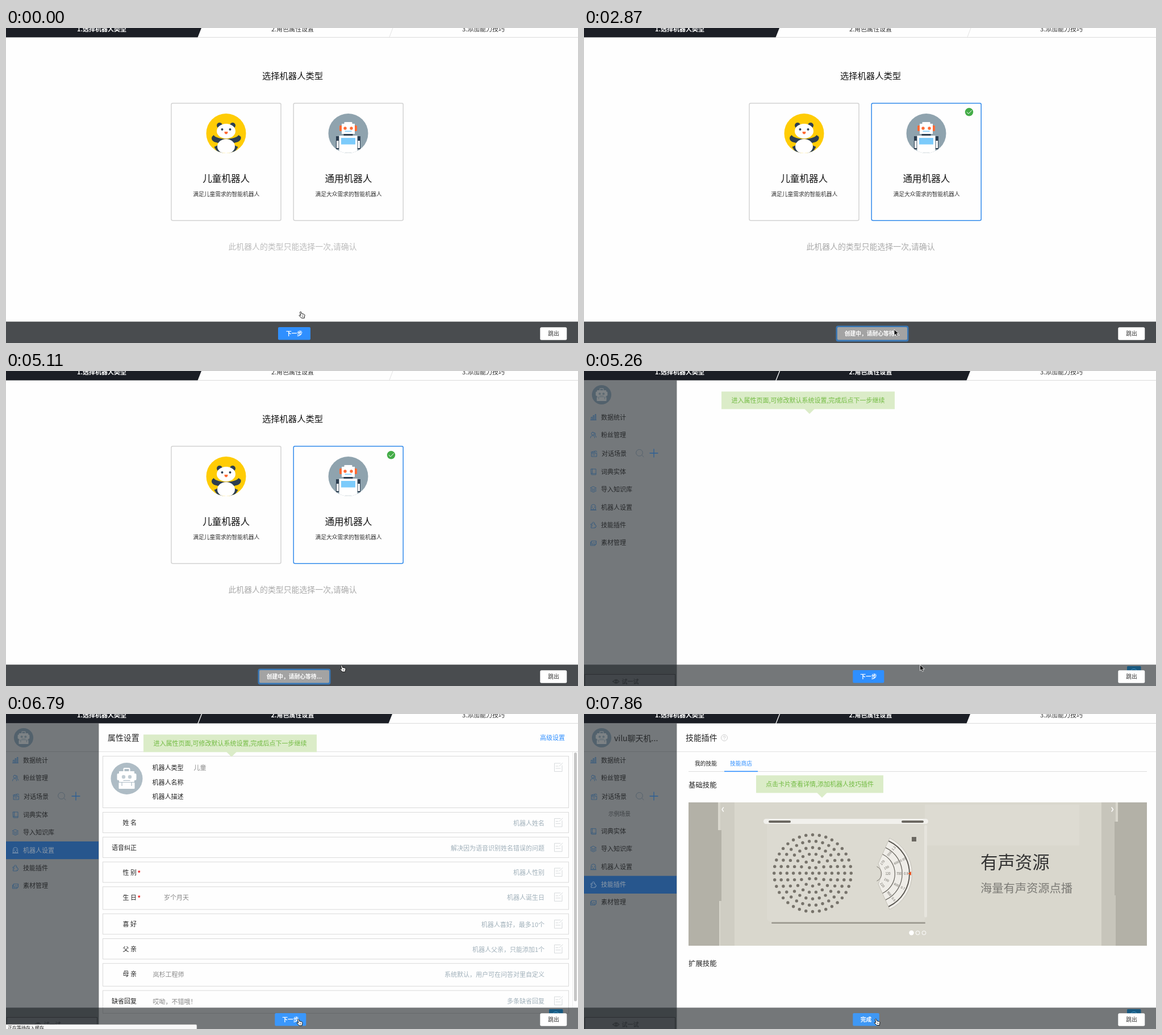
Recreate the animation shown at these times as an HTML page. Size 1007 by 556 pixels, loop 8 s.

```html
<!DOCTYPE html>
<html lang="zh-CN">
<head>
<meta charset="utf-8">
<title>机器人创建向导</title>
<style>
html, body { margin: 0; width: 100%; height: 100%; overflow: hidden; background: #fefefe; }
svg { display: block; width: 1007px; height: 556px; font-family: "Noto Sans CJK SC", "Noto Sans", sans-serif; }
</style>
</head>
<body>
<svg id="stage" viewBox="0 0 1007 556">
  <g id="scene"></g>
  <g id="cursor"></g>
</svg>
<script>
const LOOP = 8000;
const BLUE = '#2f8fff', INK = '#26282a', DARK = '#1b1e25', NAVY = '#2c3e50';

// Basic shapes
const rect = (x, y, w, h, fill, more = '') =>
  `<rect x="${x}" y="${y}" width="${w}" height="${h}" fill="${fill}" ${more}/>`;
const circle = (x, y, r, fill, more = '') =>
  `<circle cx="${x}" cy="${y}" r="${r}" fill="${fill}" ${more}/>`;
const path = (d, fill, more = '') => `<path d="${d}" fill="${fill}" ${more}/>`;
const line = (d, stroke, w = 1) =>
  path(d, 'none', `stroke="${stroke}" stroke-width="${w}" stroke-linecap="round" stroke-linejoin="round"`);
const frame = (x, y, w, h, stroke, sw = 1, r = 0) =>
  rect(x, y, w, h, '#fefefe', `stroke="${stroke}" stroke-width="${sw}" rx="${r}"`);
// Text placed by the vertical middle of its glyphs
const text = (x, mid, size, str, fill = '#222', anchor = 'start', weight = 400, more = '') =>
  `<text x="${x}" y="${(mid + size * 0.375).toFixed(2)}" font-size="${size}" fill="${fill}" text-anchor="${anchor}" font-weight="${weight}" ${more}>${str}</text>`;

function header(step) {
  const edge = step === 1 ? 344 : 680;
  const labels = [[168.5, '1.选择机器人类型'], [504.5, '2.角色属性设置'], [840.5, '3.添加能力技巧']];
  return rect(0, 0, 1007, 16.5, '#fefefe') + rect(edge - 6, 16, 1007 - edge + 6, 1, '#dcdcdc') +
    path(`M0 0H${edge}L${edge - 6.5} 16.500H0Z`, DARK) +
    (step === 1 ? line('M681 0L675 16', '#e4e4e4') : line('M344.500 0L338 16.500', '#fff', 1.3)) +
    labels.map(([x, s], i) => text(x, 2, 11, s, i < step ? '#fff' : '#333', 'middle', i < step ? 700 : 500)).join('');
}

function panda() {
  return `<g transform="translate(387.5 186)">` + circle(0, 0, 35, '#ffcc05') +
    `<g clip-path="url(#disc)">` +
    path('M-22 3C-16 12 16 12 22 3L26 6Q27 12 21 15L10 18H-10L-21 15Q-27 12-25 6Z', NAVY) +
    path('M-21 24L-13 20 -6 35H-14ZM21 24L13 20 6 35H14Z', NAVY) +
    `<ellipse cx="0" cy="23" rx="15.500" ry="13" fill="#fff"/>` +
    circle(-11.5, -14, 5, NAVY) + circle(11.5, -14, 5, NAVY) +
    `<ellipse cx="0" cy="-4" rx="16.500" ry="13" fill="#fff"/>` +
    circle(-7, -7, 2, NAVY) + circle(7, -7, 2, NAVY) +
    path('M-3-3H3Q3 1 0 1.500Q-3 1-3-3Z', '#ff6b35') + `</g></g>`;
}

function robot() {
  const arm = x => rect(x, 5, 5.5, 23, NAVY) + rect(x + 1, 13, 3.5, 13, '#fff');
  return `<g transform="translate(602.5 186)">` + circle(0, 0, 35, '#8fa3ae') +
    `<g clip-path="url(#disc)">` + arm(-21.5) + arm(16) +
    rect(-8, 0, 16, 5, NAVY) + rect(-16, 4, 32, 32, '#fff') + rect(-12.5, 8, 25, 11.5, '#7ccbfb') +
    line('M-5 34H5', '#d7dde0') +
    rect(-15.500, -14, 31, 10, '#ff6b35', 'rx="1.5"') + rect(-7, -20, 14, 6, '#fff', 'rx="1"') +
    rect(-11.5, -17, 23, 18, '#fff') +
    circle(-5.5, -9, 2.7, '#ff6b35') + circle(5.5, -9, 2.7, '#ff6b35') +
    rect(-6, -4.500, 12, 1.5, '#7ccbfb') + `</g></g>`;
}

function choosePage(s) {
  const card = (x, title, note, stroke) => frame(x, 132.7, 193, 207, stroke, 1.5, 2.5) +
    text(x + 96.7, 266, 16.6, title, '#111', 'middle') + text(x + 96.7, 293.500, 9.75, note, '#333', 'middle');
  return text(504.500, 84.500, 15.3, '选择机器人类型', '#111', 'middle') +
    card(291, '儿童机器人', '满足儿童需求的智能机器人', '#d3d3d3') +
    card(506.2, '通用机器人', '满足大众需求的智能机器人', s.picked ? '#338bec' : '#d3d3d3') +
    panda() + robot() +
    (s.checked ? circle(678, 148.300, 7.2, '#43ac47') + line('M674 148.500L677 151.300 682.300 145.700', '#fff') : '') +
    text(504.500, 386, 13.9, '此机器人的类型只能选择一次,请确认', s.settled ? '#a9a9a9' : '#bcbcbc', 'middle');
}

function avatar(x, y, k, back, front) {
  const eye = ex => circle(ex, -3, 3.200, back, 'opacity=".75"');
  return `<g transform="translate(${x} ${y}) scale(${k})">` + circle(0, 0, 28, back) +
    rect(-5, -18, 10, 6, 'none', `stroke="${front}" stroke-width="2" rx="1"`) +
    rect(-13.5, -13, 27, 19, front, 'rx="1"') + rect(-17, -9, 34, 12, front, 'rx="2"') +
    eye(-5.5) + eye(5.5) + rect(-6, 2.800, 12, 1.2, back) +
    rect(-14, 7, 28, 11, front, 'rx="1"') + rect(-9, 7, 1.2, 6, back) + rect(8, 7, 1.2, 6, back) + `</g>`;
}

// Menu entries: label, middle, icon path in a 10 px box
const MENU = [
  ['数据统计', 81.5, 'M0 10H10M1 9V5H3V9M4.500 9V2H6V9M8 9V0H9.500V9'],
  ['粉丝管理', 113, 'M4 0A2.300 2.300 0 1 0 4 5A2.300 2.300 0 1 0 4 0M0 10Q0 6 4 6T7 10M6.500 1A2 2 0 1 1 7 5Q10 6 10 9'],
  ['对话场景', 146, 'M1 4H10V10H1ZM1 4L0 2 9 0 10 2M3 1.500L4 4M6 1L7 4M3 7H7'],
  ['词典实体', 178, 'M1 0H9.500V10H2Q1 10 1 8.500ZM1 8H9.500M3 0V8'],
  ['导入知识库', 209, 'M5 0L10 2.500 5 5 0 2.500ZM0 5L5 7.500 10 5M0 7.500L5 10 10 7.500'],
  ['机器人设置', 240.500, 'M1 9V4Q1 0 5 0T9 4V9ZM0 10H10M3 4V5.500M7 4V5.500M4 7.500H6'],
  ['技能插件', 272, 'M1 3H3.500Q2 0 5 0T6 3H8V5Q10.500 5 10 7.500T8 8V10H1V7Q3.500 7 3 5.500T1 5Z'],
  ['素材管理', 303, 'M2 2H10V8H2ZM2 4H0V10H8V8M3.500 6.500L5.500 4.500 7 6 9 4']
];

function sidebar(s) {
  const active = s.page === 2 ? 5 : s.page === 3 ? 6 : -1;
  const items = MENU.map(([label, mid, icon], i) => {
    const y = mid + (s.named && i > 2 ? 29.3 : 0), on = i === active, dx = i === 2 ? 1 : 0;
    return (on ? rect(0, y - 15.6, 163, 31.300, '#27568d') : '') +
      `<g transform="translate(${11.500 + dx} ${y - 5})">` + line(icon, on ? '#7f98b3' : '#345a7e', 0.9) + `</g>` +
      text(30 + dx, y, 11, label, on ? '#8f9ba8' : INK, 'start', on ? 500 : 400);
  }).join('');
  return rect(0, 16, 163.4, 540, '#74787b') + avatar(31, 42, 0.61, '#52616c', '#7d8285') +
    (s.page > 1 ? rect(0, 66, 163, 1, '#676b6e') : '') +
    (s.named ? text(53, 43, 14, 'vilu聊天机...', INK) + text(43, 176.500, 9.75, '示例场景', '#3d4144') : '') +
    items + circle(97.500, 144.300, 5.800, 'none', 'stroke="#55626e"') + line('M101.800 148.500L105 151.500', '#55626e') +
    line('M116 145H130M123 138V152', '#2d5f95', 1.3);
}

function editIcon(y) {
  return line(`M976 ${y - 7}H965.500V${y + 7.500}H979V${y - 3}M968 ${y - 2}H972M968 ${y + 2}H976M974 ${y - 2}L980 ${y - 7.500}`, '#d3d6d9', 0.9);
}

function propsPage(s) {
  const on = s.loaded, grey = '#868686';
  const birth = on
    ? text(258, 0, 10.5, '11/10/2016', grey, 'start', 400, 'font-family="Liberation Sans, sans-serif" letter-spacing="-.6"') +
      text(323, 0, 11, '0岁0个月0天', grey) + text(402, 0, 11, '猴', grey) + text(432.500, 0, 11, '天蝎座', grey)
    : text(278, 0, 11, '岁个月天', grey);
  const val = v => text(258.500, 0.5, 11, v, grey);
  const rows = [
    ['姓 名', '机器人姓名'],
    ['语音纠正', '解决因为语音识别姓名错误的问题'],
    ['性 别', '机器人性别', on ? val('女') : '', 1],
    ['生 日', '机器人诞生日', birth, 1],
    ['喜 好', '机器人喜好，最多10个'],
    ['父 亲', '机器人父亲，只能添加1个'],
    ['母 亲', '系统默认，用户可在问答对里自定义', val('岚杉工程师')],
    ['缺省回复', '多条缺省回复', val('哎呦，不错哦！')]
  ];
  let y = 173, out = '';
  rows.forEach(([label, hint, value = '', must], i) => {
    const h = value ? 40.6 : 36.6;
    out += frame(170.500, y + 0.5, 820, h - 0.5, '#dadada') + text(230, y + 19, 11, label, '#222', 'end') +
      (must ? text(231.500, y + 20, 11, '*', '#e11', 'start', 700) : '') +
      `<g transform="translate(0 ${y + 19.3})">${value}</g>` +
      text(948, y + 19.700, 11, hint, '#a0b0ba', 'end') + (i === 6 ? '' : editIcon(y + 18.5));
    y += h + 7.2;
  });
  const field = (mid, label, value) => text(257.500, mid, 11, label, '#222') + value;
  return text(179, 42, 13.9, '属性设置', '#222') + text(984, 42, 11, '高级设置', BLUE, 'end') +
    rect(163, 66, 844, 1, '#e2e2e2') + rect(997, 67, 1, 451, '#ececec') +
    rect(1000, 68, 5, on ? 435 : 439, '#c6c6c6', 'rx="2.5"') +
    frame(170.500, 74.500, 820, 91, '#dadada') + avatar(212.500, 114, 1, '#aebcc5', '#fff') + editIcon(94) +
    field(95, '机器人类型', text(330.500, 95, 11, on ? '通用' : '儿童', grey)) +
    field(120.500, '机器人名称', on ? text(328, 120.500, 11, 'vilu聊天机器人', grey) : '') +
    field(146, '机器人描述', on ? text(328, 146, 11, '来自岚杉智能vilu.ai的酷炫聊天机器人', grey) : '') + out;
}

function banner() {
  let holes = '';
  for (let k = 0; k <= 6; k++) {
    const n = k ? 6 * k : 1;
    for (let i = 0; i < n; i++) {
      const a = i / n * 2 * Math.PI;
      holes += circle((402.5 + 11.3 * k * Math.cos(a)).toFixed(1), (281 + 11.3 * k * Math.sin(a)).toFixed(1), 2.7, '#77736b');
    }
  }
  const arc = (r, c, w) => {
    const dx = r * 0.42, dy = r * 0.9;
    return line(`M${510 + dx} ${282 - dy}A${r} ${r} 0 0 1 ${510 + dx} ${282 + dy}`, c, w);
  };
  // Scale figures fan out around the dial
  const figures = (r, list) => list.map((n, i) => {
    const a = (i - (list.length - 1) / 2) * 26;
    return text(510 + r, 282, 5.5, n, '#66635c', 'middle', 500, `transform="rotate(${a} 510 282)"`);
  }).join('');
  return rect(184, 156, 807, 253, '#d9d7cd') +
    rect(600, 160, 272, 72, '#dddbd2') + rect(240, 156, 25, 253, '#cfcdc3') + rect(911, 156, 25, 253, '#c7c5bb') +
    path('M184 156H236V205H242V330H238V409H184Z', '#b3b1a7') + path('M991 156H940V190H934V320H936V409H991Z', '#b3b1a7') +
    rect(330, 367.500, 271, 2.5, '#98958c', 'rx="1.2"') +
    rect(322, 188, 279, 178, '#dcdad1', 'rx="6"') + rect(316, 185, 290, 9, '#f1f0ec', 'rx="4.5"') +
    rect(325, 188, 39, 4, '#6b6861', 'rx="2"') + rect(559, 188, 39, 4, '#6b6861', 'rx="2"') +
    rect(599, 196, 5, 163, '#e6e4dd', 'rx="2.5"') + holes +
    path('M538 219A70 70 0 0 1 538 345L518 300Q527 282 518 264Z', '#efede8', 'stroke="#c4c1b8"') +
    arc(64, '#55524c', 1.8) + arc(51, '#66635c', 1.2) + arc(38, '#66635c', 1.2) + arc(14, '#77736b', 1) +
    figures(25, ['170', '150', '120', '190', '220']) + figures(44.500, ['550', '600', '700', '800', '900']) +
    figures(57, ['1.2', '0.95', '0.8', '0.7', '0.6']) +
    path('M570.500 281.500L576 278V285Z', '#e8531f') + rect(577, 217, 8, 8, '#6b6861') +
    text(698, 262, 30.4, '有声资源', '#333') + text(698, 307.500, 20.25, '海量有声资源点播', '#7b7a75') +
    line('M245.500 165L243 168.500 245.500 172M929 165L931.500 168.500 929 172', '#fff', 1.3) +
    circle(576.500, 386.300, 4.200, '#fff') + [587.5, 598.500].map(x => circle(x, 386.300, 3.400, 'none', 'stroke="#fff"')).join('');
}

function skillsPage() {
  return text(179, 42, 13.9, '技能插件', '#222') + circle(247, 42, 5.500, 'none', 'stroke="#cfcfcf"') +
    line('M245 41Q245 39 247 39T249 41Q248.500 42.500 247 42.500M247 44.500V45', '#cfcfcf') +
    rect(163, 66, 844, 1, '#e2e2e2') +
    text(195, 87.500, 9.75, '我的技能') + text(257, 87, 9.75, '技能商店', BLUE) +
    rect(184, 101, 807, 1, '#dcdcdc') + rect(247, 100.500, 59, 1.6, BLUE) +
    text(184, 125.500, 12.4, '基础技能') + banner() + text(184, 440, 12.4, '扩展技能');
}

function tip(x, y, w, nose, str) {
  return rect(x, y, w, 31, '#dbecc8') + path(`M${nose - 9} ${y + 30.500}H${nose + 9}L${nose} ${y + 39.500}Z`, '#dbecc8') +
    text(x + w / 2, y + 15.8, 11, str, '#72bb42', 'middle', 500);
}

function bar(s) {
  const button = (x, w, str, fill) => rect(x, 528, w, 22.5, fill, 'rx="2"') +
    text(x + w / 2, 539.500, 9.75, str, '#fff', 'middle', 700);
  let out;
  if (s.page === 0) {
    out = rect(0, 518.3, 1007, 38, '#494c4f') + (s.busy
      ? rect(443.500, 525.500, 128, 28, '#3a78b6', 'rx="4"') + button(446, 123, '创建中，请耐心等待...', '#a3a3a3')
      : button(479, 57, '下一步', BLUE));
  } else {
    out = rect(0, 518.3, 1007, 38, '#1a1e22', 'opacity=".6"') +
      rect(1.5, 535.5, 159, 24, '#42464a', 'stroke="#2b2e31"') +
      line('M51 548Q56.500 541.500 62 548Q56.500 554.500 51 548Z', '#24282b') + circle(56.500, 548, 1.8, 'none', 'stroke="#24282b"') +
      text(66.500, 548, 10, '试一试', '#24282b') +
      rect(956, 521, 24.500, 20, '#17587f', 'rx="1.5"') + circle(968, 531, 5.5, 'none', 'stroke="#3b8fc0"') +
      (s.done ? button(473.3, 46.5, '完成', '#3f98f5') : button(473.3, 55, '下一步', s.page > 1 ? '#3a97fb' : BLUE));
  }
  return out + rect(940.3, 528.3, 47, 22.5, '#fff', 'rx="2.5"') + text(964, 539.500, 9.75, '跳出', '#333', 'middle');
}

function draw(s) {
  const defs = '<clipPath id="disc"><circle r="35"/></clipPath>';
  let out = `<defs>${defs}</defs>` + rect(0, 0, 1007, 556, '#fefefe');
  if (s.page === 0) return out + choosePage(s) + header(1) + bar(s);
  out += (s.page === 2 ? propsPage(s) : s.page === 3 ? skillsPage() : '') + sidebar(s) + header(2) + bar(s);
  out += s.done ? tip(303, 108.3, 224, 419, '点击卡片查看详情,添加机器人技巧插件')
                : tip(242, 36.3, 305, 397, '进入属性页面,可修改默认系统设置,完成后点下一步继续');
  if (s.status) out += rect(-2, 548, 338, 12, '#f8f8f8', 'stroke="#999" stroke-width=".6" rx="2"') +
    text(3, 554, 8, '正在等待存入缓存...', '#222');
  return out;
}

const HAND = path('M2 1.500Q3-.2 4.300 1.400L5 4.300 9 5.200Q10.700 5.800 10.500 7.500L9.800 10.300V12H4.800L.6 7.600Q.8 6.200 2.300 6.800L3.300 7.500Z', '#fff', 'stroke="#111" stroke-width="1" stroke-linejoin="round"') +
  line('M6 7.500V9.500M7.600 7.500V9.500', '#333', 0.6);
const ARROW = path('M.5 .5V11L3 8.800 4.700 12.500 6.700 11.600 5 8H8.500Z', '#111', 'stroke="#fff" stroke-width=".8"');

// Pointer stops: time, x, y, shape
const POINTER = [
  [0, 515.5, 500, HAND], [150, 517, 528, HAND], [300, 548, 420, HAND], [450, 592, 312, HAND], [630, 600, 292, HAND],
  [1070, 590, 335, HAND], [1220, 555, 440, ARROW], [1370, 524, 520, ARROW], [1520, 513.5, 537, HAND],
  [2270, 514, 537, ARROW], [2870, 545.5, 531.5, ARROW], [3020, 578, 525, ARROW], [3170, 595, 521.5, ARROW],
  [3620, 595, 522, HAND], [4070, 601, 521.5, HAND], [4370, 599, 518, HAND], [4520, 593, 515, HAND],
  [4670, 589.5, 517, HAND], [4970, 587.5, 519, HAND], [5260, 591, 518, ARROW],
  [5710, 585, 521, ARROW], [5860, 568, 527, ARROW], [6010, 545, 533, ARROW], [6160, 525, 537, HAND],
  [6340, 514, 538, HAND], [6490, 511.5, 538, HAND], [7710, 510.5, 537.5, HAND]
];

const scene = document.getElementById('scene'), cursor = document.getElementById('cursor');
let lastKey = '', lastShape = '';

function update(t) {
  const s = {
    page: t < 5260 ? 0 : t < 6640 ? 1 : t < 7860 ? 2 : 3,
    picked: t >= 450, checked: t >= 920, busy: t >= 1820, settled: t >= 2870,
    status: t >= 5560 && t < 7260, loaded: t >= 6940, named: t >= 7090, done: t >= 7710
  };
  const key = JSON.stringify(s);
  if (key !== lastKey) { scene.innerHTML = draw(s); lastKey = key; }
  const [, x, y, shape] = POINTER.filter(p => p[0] <= t).pop();
  if (shape !== lastShape) { cursor.innerHTML = shape; lastShape = shape; }
  cursor.setAttribute('transform', `translate(${x} ${y})`);
}

const start = performance.now();
function tick() {
  update((performance.now() - start) % LOOP);
  requestAnimationFrame(tick);
}
update(0);
requestAnimationFrame(tick);
</script>
</body>
</html>
```
